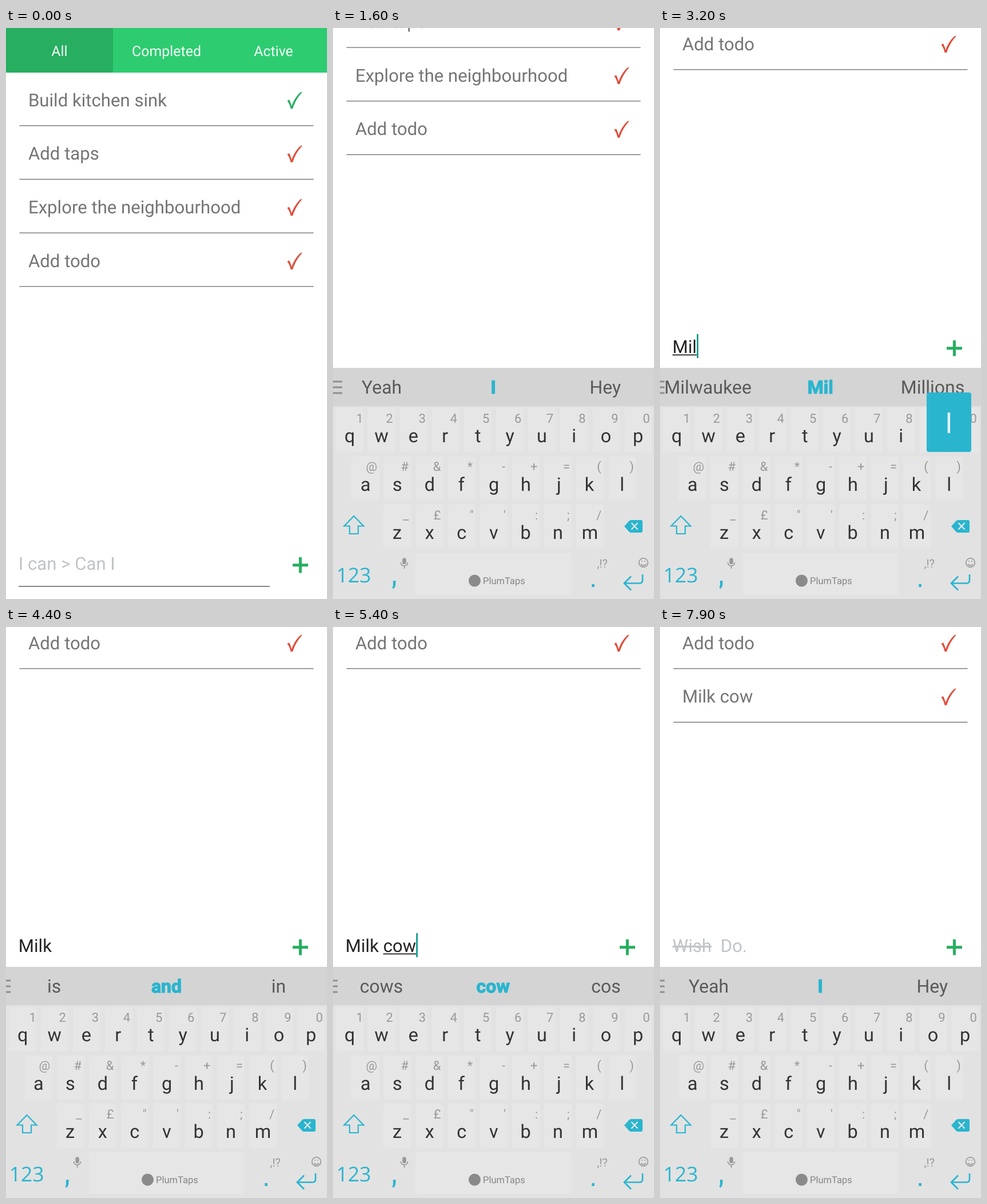
These frames come from a looping animation (561x998 px, 8 s). An HTML page:

```html
<!DOCTYPE html>
<html lang="en">
<head>
<meta charset="utf-8">
<title>Todo list</title>
<style>
  html, body { margin: 0; width: 100%; height: 100%; overflow: hidden; background: #fff; }
  svg { display: block; width: 561px; height: 998px; }
  text { font: 31.17px Roboto, sans-serif; white-space: pre; text-rendering: geometricPrecision; }
  .tab { font-size: 24.93px; fill: #f4fff8; text-anchor: middle; }
  .item { fill: #757575; }
  .hint { fill: #c0c4c7; }
  .typed { fill: #222; }
  .word { font-size: 32px; fill: #5a5a5a; }
  .best { fill: #2ab5cf; font-weight: 700; stroke: #2ab5cf; stroke-width: 1.2; }
  .key { fill: #e6e6e6; }
  .down { fill: #d0d0d0; }
  .letter { font-size: 32.5px; fill: #333; }
  .alt { font-size: 22px; fill: #999; }
  .line { fill: none; stroke: #2ab5cf; stroke-width: 2.2; }
  .cyan { fill: #2ab5cf; }
</style>
</head>
<body>
<svg viewBox="0 0 561 998">
  <g id="app">
    <rect width="561" height="78" fill="#2ecc71"/>
    <rect width="187" height="78" fill="#27ae60"/>
    <text class="tab" x="93.5" y="49">All</text>
    <text class="tab" x="280.5" y="49">Completed</text>
    <text class="tab" x="467.5" y="49">Active</text>
    <g id="list"></g>
    <text id="hintA" class="hint" x="21.8" y="947.3">I can &gt; Can I</text>
    <text id="hintB" class="hint" x="21.8" y="947.3"><tspan text-decoration="line-through">Wish</tspan>  Do.</text>
    <text id="typed" class="typed" x="21.8" y="947.3"></text>
    <rect id="under" y="949.5" height="1.8" fill="#222"/>
    <rect id="caret" y="914" width="2.6" height="42" fill="#009688"/>
    <rect x="22" y="975" width="439" height="1.8" fill="#7a7a7a"/>
    <path id="plus" d="M501 938.8h27M514.4 925v27.6" stroke="#27ae60" stroke-width="5"/>
  </g>

  <g id="board">
    <rect y="594" width="561" height="67" fill="#d4d4d4"/>
    <rect y="661" width="561" height="337" fill="#e2e2e2"/>
    <path id="menu" d="M0 618h16M0 628h16M0 638h16" stroke="#8e8e8e" stroke-width="3"/>
    <text class="word" y="639.3"></text>
    <text class="word best" y="639.3"></text>
    <text class="word" y="639.3"></text>
    <g id="keys"></g>

    <path id="shift" class="line"/>
    <path class="cyan" d="M509 871l8.5-9.5q1.5-1.5 3.5-1.5h17q3 0 3 3v16q0 3-3 3h-17q-2 0-3.5-1.5z"/>
    <path d="M521.5 865l11 11.5m0-11.5l-11 11.5" stroke="#e6e6e6" stroke-width="2.2"/>

    <text class="cyan" x="5.7" y="968.5" style="font:35.5px 'Open Sans', sans-serif">123</text>
    <path class="cyan" d="M105 966h4.5v5c0 4-1.2 6.5-3.5 9l-2.5-1.6c1.2-2 1.6-4 1.5-6zM452.3 972h4.6v5h-4.6z"/>
    <g fill="none" stroke="#999" stroke-width="1.7">
      <rect x="122.2" y="927" width="4.8" height="9.5" rx="2.4" fill="#999"/>
      <path d="M118.5 934c0 8 12 8 12 0M124.6 940v5"/>
      <circle cx="542.5" cy="934.5" r="7.8"/>
      <path d="M538.3 937c2 3.4 6.4 3.4 8.4 0M539 932h2m3 0h2"/>
    </g>
    <text class="alt" x="461.5" y="943" style="font-size:20px">,!?</text>
    <path class="line" style="stroke-width:2.7" d="M541 955v10q0 5.500-5.500 5.500H510M521 958.500l-12 12 12 12"/>
    <circle cx="247.5" cy="966" r="10.5" fill="#8a8a8a"/>
    <text x="262" y="972" fill="#868686" style="font-size:16.5px">PlumTaps</text>

    <g id="pop">
      <rect width="78" height="104" rx="4" class="cyan"/>
      <text y="70.5" fill="#e8f2f4" style="font-size:48px"></text>
    </g>
  </g>
</svg>

<script>
const LOOP = 8000, STEP = 100, PAN = 379, ROW = 93.67;
const $ = id => document.getElementById(id);
const meter = document.createElement("canvas").getContext("2d");

function add(parent, tag, attrs, text = "") {
  const el = document.createElementNS("http://www.w3.org/2000/svg", tag);
  for (const name in attrs) el.setAttribute(name, attrs[name]);
  el.textContent = text;
  return parent.appendChild(el);
}

function measure(el, text) {
  const { fontWeight, fontSize, fontFamily } = getComputedStyle(el);
  meter.font = `${fontWeight} ${fontSize} ${fontFamily}`;
  return meter.measureText(text);
}

// Sets text so that its ink, not its advance, is centred on x.
function centreInk(el, text, x) {
  if (el.textContent === text) return;
  const m = measure(el, text);
  el.textContent = text;
  el.setAttribute("x", x - (m.actualBoundingBoxRight - m.actualBoundingBoxLeft) / 2);
}

// Todo rows
const rows = ["Build kitchen sink", "Add taps", "Explore the neighbourhood", "Add todo", "Milk cow"].map((label, i) => {
  const row = add($("list"), "g", { transform: `translate(0 ${i * ROW})` });
  add(row, "text", { class: "item", x: 38.95, y: 136.8 }, label);
  add(row, "path", {
    fill: i ? "#df4e3b" : "#27ae60",
    d: "M491.5 127L495 125.3C497 129 498.3 133 499 136.5C503 126 508 118 515 112L517.8 112C510 120.5 505 129 501 141L497.5 141C496.3 136 495 131.5 491.5 127z"
  });
  add(row, "rect", { x: 23.5, y: 170.2, width: 514, height: 1.1, fill: "#555" });
  return row;
});

// Keyboard
const keys = {};
[["qwertyuiop", "1234567890", 28.5], ["asdfghjkl", "@#&*-+=()", 56.5], ["zxcvbnm", "_£\"':;/", 112.6]]
  .forEach(([letters, alts, left], r) => {
    const top = 664 + r * 84.4;
    [...letters].forEach((ch, i) => {
      const x = left + i * 56.1;
      const rect = add($("keys"), "rect", { class: "key", x: x - 24, y: top, width: 48, height: 77.5, rx: 4 });
      const alt = add($("keys"), "text", { class: "alt", y: top + 26 }, alts[i]);
      alt.setAttribute("x", x + 20 - measure(alt, alts[i]).actualBoundingBoxRight);
      const label = add($("keys"), "text", { class: "letter", y: top + 60.2 });
      keys[ch] = { x, top, rect, label };
    });
  });
keys[" "] = { rect: add($("keys"), "rect", { class: "key", x: 144, y: 918, width: 273, height: 73, rx: 4 }) };

// key, pressed, released, bubble gone
const taps = [
  ["m", 2500, 2700, 2800], ["i", 2800, 2900, 3000], ["l", 3100, 3200, 3300], ["k", 3400, 3500, 3600],
  [" ", 3800, 3900, 3800], ["c", 4500, 4500, 4700], ["o", 4900, 5000, 5100], ["w", 5200, 5300, 5400]
];
// time, text, start of the underlined word, suggestions
const entries = [
  [0, "", 0, "Yeah,I,Hey"],
  [2700, "M", 0, "My,M,Me"],
  [2900, "Mi", 0, "Might,Mi,Mind"],
  [3200, "Mil", 0, "Milwaukee,Mil,Millions"],
  [3500, "Milk", 0, "Milky,Milk,Milkman"],
  [3900, "Milk ", 5, "is,and,in"],
  [4600, "Milk c", 5, "C,c,can"],
  [5000, "Milk co", 5, "cos,co,cow"],
  [5300, "Milk cow", 5, "cows,cow,cos"],
  [6900, "", 0, ",,"],
  [7200, "", 0, "Yeah,I,Hey"]
];
const caretOn = [[1400, 1900], [2300, 4400], [4600, 5800], [6300, 6800], [7000, 7500]];

const clamp = v => Math.min(1, Math.max(0, v));
const during = (t, a, b) => t >= a && t < b;
const easeOut = v => 1 - (1 - clamp(v)) ** 3;
const show = (el, on) => el.setAttribute("visibility", on ? "visible" : "hidden");
const words = document.querySelectorAll(".word");

function drawInput(t) {
  const [, text, from, guesses] = entries.findLast(e => t >= e[0]);
  const xAt = n => 21.8 + measure($("typed"), text.slice(0, n)).width;
  const start = xAt(from), end = xAt(text.length);
  $("typed").textContent = text;
  show($("hintA"), !text && t < 6900);
  show($("hintB"), !text && t >= 6900);
  $("under").setAttribute("x", start);
  $("under").setAttribute("width", Math.max(0, end - start));
  $("caret").setAttribute("x", end + 0.2);
  show($("caret"), caretOn.some(([a, b]) => during(t, a, b)));
  guesses.split(",").forEach((word, i) => centreInk(words[i], word, 84.3 + i * 196.2));
  $("plus").setAttribute("opacity", during(t, 6800, 6900) ? 0.6 : during(t, 6900, 7000) ? 0.3 : 1);
}

function drawKeys(t) {
  const caps = during(t, 2300, 2700);
  for (const ch in keys) {
    const { x, rect, label } = keys[ch];
    const down = taps.some(([k, a, b]) => k === ch && during(t, a, b));
    rect.setAttribute("class", down ? "down" : "key");
    if (label) centreInk(label, caps ? ch.toUpperCase() : ch, x);
  }
  $("shift").setAttribute("d", "M36.5 853L19.5 870.5h9.5v" + (caps ? "11h15v-11" : "13.5h15v-13.5") +
    "h9.5z" + (caps ? "M24 890.5h25.5" : ""));
  $("menu").setAttribute("transform", `translate(${t < 2700 ? 0 : -8} 0)`);

  const tap = taps.find(([, a, , c]) => during(t, a, c));
  show($("pop"), tap);
  if (tap) {
    const { x, top } = keys[tap[0]];
    $("pop").setAttribute("transform", `translate(${Math.round(x - 39)} ${Math.round(top - 111)})`);
    centreInk($("pop").lastElementChild, tap[0] === "m" ? "M" : tap[0], 39);
  }
}

function draw(t) {
  $("app").setAttribute("transform", `translate(0 ${-PAN * easeOut((t - 1533) / 250)})`);
  const rise = easeOut((t - 1420) / 140);
  $("board").setAttribute("transform", `translate(0 ${80 * (1 - rise)})`);
  $("board").setAttribute("opacity", rise);
  rows[4].setAttribute("opacity", t < 7200 ? 0 : clamp((t - 7150) / 700));
  drawInput(t);
  drawKeys(t);
}

// The picture advances ten times a second, like a screen recording.
const began = performance.now();
function tick() {
  const t = (performance.now() - began) % LOOP;
  draw(Math.floor(t / STEP) * STEP);
  requestAnimationFrame(tick);
}
tick();
</script>
</body>
</html>
```
